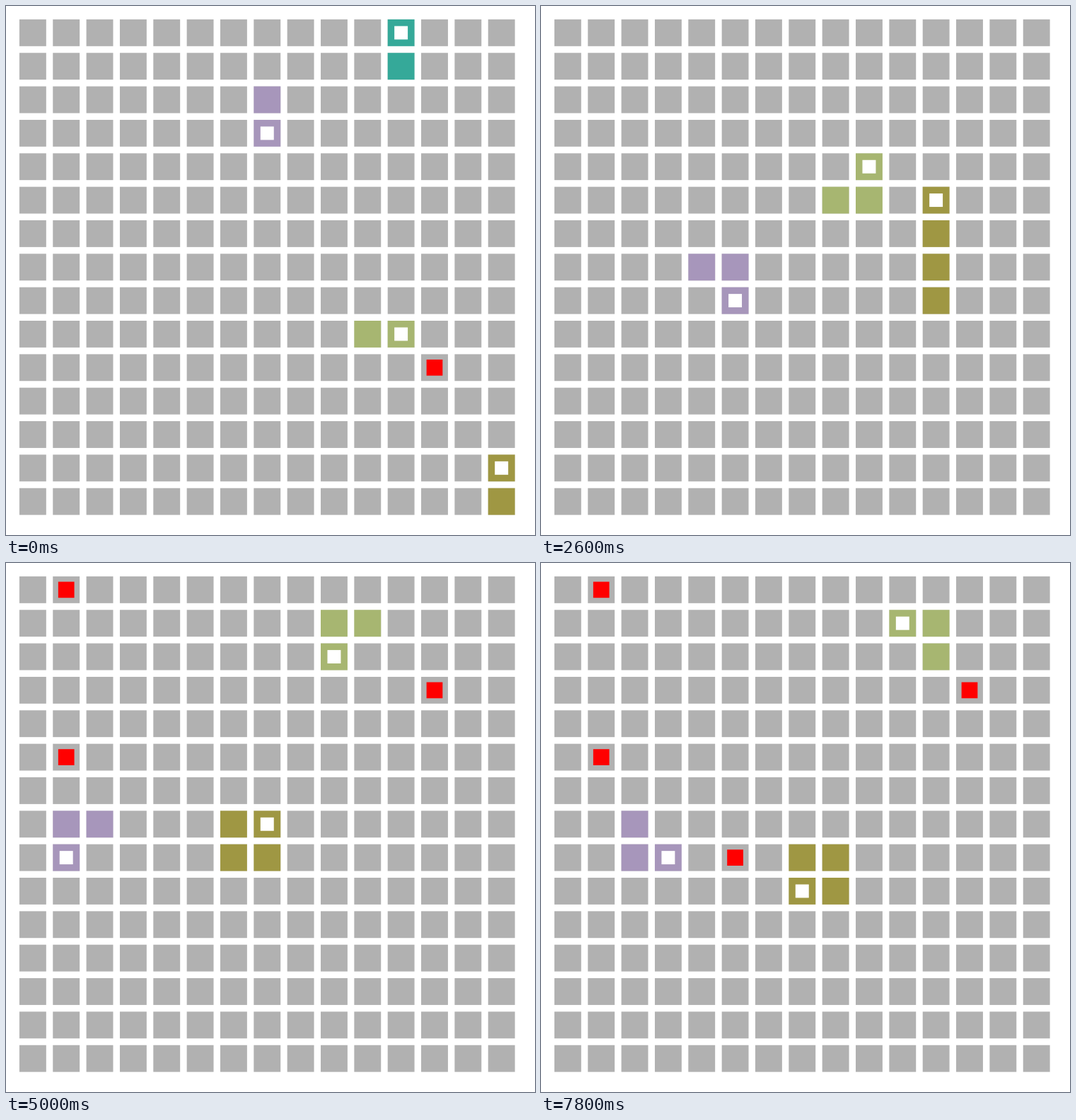
Animation, 748 px wide and 748 px high, one loop 8000 ms. Source, as an HTML page with a canvas:

```html
<!DOCTYPE html>
<html lang="en">
<head>
<meta charset="utf-8">
<title>Snakes</title>
<style>
html, body { margin: 0; width: 100%; height: 100%; overflow: hidden; background: #fff; }
canvas { display: block; width: 100%; height: 100%; }
</style>
</head>
<body>
<canvas id="board" width="748" height="748"></canvas>
<script>
const ctx = document.getElementById('board').getContext('2d');
const STEP_MS = 200, STEPS = 40, SIZE = 15;
const UNIT = 748 / 79; // a cell is 4 units wide, with a gap of 1
const DIRS = { U: [0, -1], D: [0, 1], L: [-1, 0], R: [1, 0] };

// Snakes begin coiled on one cell, so the tail unrolls during the first steps.
const snakes = [
  { color: '#35a999', start: [11, 1], moves: 'U', dies: 1 },
  { color: '#a796bb', start: [7, 2],
    moves: 'DDLDLDLDLURDRDLULDLURDLULDRRDLURDLULURDR' },
  { color: '#a7b671', start: [10, 9],
    moves: 'RULULULURDLURURURULDRULULDDLDRULDRURURUL' },
  { color: '#9f9743', start: [14, 14], grows: 8,
    moves: 'UULUUULDLUUUUULDLDLDLULDRURULDRULDLDRRDL' }
];

const foods = [
  { cell: [12, 10], from: 0, to: 7 },
  { cell: [12, 3], from: 15, to: STEPS },
  { cell: [1, 0], from: 21, to: STEPS },
  { cell: [1, 5], from: 23, to: STEPS },
  { cell: [5, 8], from: 30, to: STEPS }
];

for (const snake of snakes) {
  snake.path = [snake.start];
  for (const move of snake.moves) {
    const [x, y] = snake.path[snake.path.length - 1];
    const [dx, dy] = DIRS[move];
    snake.path.push([x + dx, y + dy]);
  }
}

function square([col, row], color, inset = 0) {
  const side = 4 - 2 * inset;
  ctx.fillStyle = color;
  ctx.fillRect((2 + 5 * col + inset) * UNIT, (2 + 5 * row + inset) * UNIT, side * UNIT, side * UNIT);
}

function drawSnake({ path, color, grows = STEPS, dies = STEPS }, step) {
  if (step >= dies) return;
  const head = step + 1;
  const length = step >= grows ? 4 : 3;
  const body = path.slice(Math.max(0, head - length + 1), head + 1);
  for (const cell of body) {
    square(cell, '#fff');
    square(cell, color);
  }
  square(path[head], '#fff', 1);
}

function draw(step) {
  ctx.fillStyle = '#fff';
  ctx.fillRect(0, 0, 748, 748);
  for (let row = 0; row < SIZE; row++) {
    for (let col = 0; col < SIZE; col++) square([col, row], '#b1b1b1');
  }
  for (const { cell, from, to } of foods) {
    if (step >= from && step < to) square(cell, '#f00', 0.8);
  }
  for (const snake of snakes) drawSnake(snake, step);
}

let shown = -1;
function tick() {
  const step = Math.floor(performance.now() / STEP_MS) % STEPS;
  if (step !== shown) draw(shown = step);
  requestAnimationFrame(tick);
}
tick();
</script>
</body>
</html>
```
